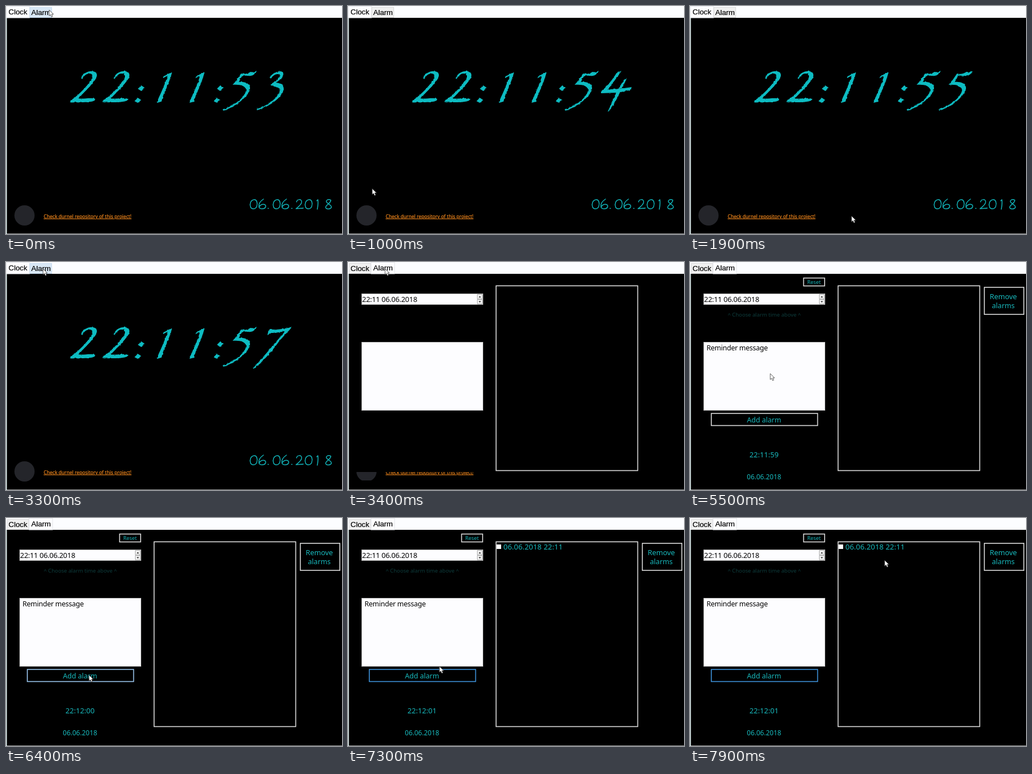
Animation of 599 by 405 pixels, one loop 8 s. Source, as an HTML page:

```html
<!DOCTYPE html>
<html lang="en">
<head>
<meta charset="utf-8">
<title>Desktop clock</title>
<style>
html, body { margin: 0; width: 100%; height: 100%; overflow: hidden; background: #fcfdff; }
svg { display: block; width: 599px; height: 405px; }
text { font-family: "Noto Sans", "Open Sans", sans-serif; white-space: pre; }
.tab { font: 13.4px "Liberation Sans", Arial, sans-serif; stroke: #000; stroke-width: .2; }
.teal { fill: #18b8bc; }
.mid { text-anchor: middle; }
.frame { fill: none; stroke: #dcdcdc; stroke-width: 1.6; }
</style>
</head>
<body>
<svg viewBox="0 0 599 405" xmlns="http://www.w3.org/2000/svg">
  <defs>
    <filter id="rough" x="-5%" y="-10%" width="110%" height="120%">
      <feTurbulence type="fractalNoise" baseFrequency=".22" numOctaves="2" seed="4"/>
      <feDisplacementMap in="SourceGraphic" scale="3" xChannelSelector="R" yChannelSelector="G"/>
    </filter>
    <clipPath id="leftover"><path d="M0 347h250v5H0zM0 373h250v15H0z"/></clipPath>
  </defs>
  <rect width="599" height="405" fill="#fcfdff"/>
  <path d="M0 21H1.5V405H0z" fill="#e6fafa"/>
  <rect x="1.5" y="21" width="597.5" height="383.4"/>
  <rect id="clockTab"/>
  <rect id="alarmTab"/>
  <text id="clockName" class="tab" x="4.5">Clock</text>
  <text id="alarmName" class="tab" x="45">Alarm</text>

  <g id="clockPage">
    <g id="digits" fill="#10bcc2" filter="url(#rough)"></g>
    <g id="bigDate" fill="none" stroke="#12b4ba" stroke-width="1.5" stroke-linecap="round" stroke-linejoin="round"></g>
  </g>
  <g id="footer">
    <circle cx="33" cy="372" r="18" fill="#24252a"/>
    <text x="67.3" y="376.7" font-size="8.58" fill="#e8821c" stroke="#e8821c" stroke-width=".2" text-decoration="underline">Check durnel repository of this project!</text>
  </g>

  <g id="alarmPage">
    <rect x="24.5" y="56.5" width="216" height="19" fill="#fdfdff" stroke="#b4b4b4"/>
    <text x="25" y="71" font-size="13" letter-spacing="-.3">22:11 06.06.2018</text>
    <path d="M230.5 57.5h9v8h-9zM230.5 66.5h9v8h-9z" fill="#f0f0f0" stroke="#b0b0b0"/>
    <path d="M233 63l2-2.5 2 2.5zM233 69.5l2 2.5 2-2.5z" fill="#222"/>
    <rect x="24.5" y="142.5" width="216" height="121" fill="#fdfdff" stroke="#b4b4b4"/>
    <rect class="frame" x="264" y="42.3" width="252.5" height="328.2"/>
    <g id="controls">
      <rect class="frame" x="202.5" y="28.5" width="37.5" height="14"/>
      <text class="teal mid" x="221" y="39" font-size="9.3">Reset</text>
      <text class="mid" x="132.5" y="96.5" font-size="9.6" fill="#0d3c3c">^ Choose alarm time above ^</text>
      <text x="29.5" y="157" font-size="12.5" letter-spacing="-.25">Reminder message</text>
      <rect class="frame" id="addBox" x="38" y="269" width="189.5" height="21.5"/>
      <text class="teal mid" x="132" y="284.5" font-size="12.6">Add alarm</text>
      <text class="teal mid" id="smallTime" x="132" y="346.5" font-size="13.1"></text>
      <text class="teal mid" x="132" y="386" font-size="12">06.06.2018</text>
      <rect class="frame" x="524.7" y="45" width="70.5" height="48"/>
      <text class="teal mid" x="558.5" y="66" font-size="12.9">Remove</text>
      <text class="teal mid" x="558.5" y="82" font-size="12.6">alarms</text>
    </g>
    <g id="item">
      <rect x="265" y="47" width="8" height="8" fill="#fff"/>
      <text class="teal" x="277" y="56" font-size="13.35">06.06.2018 22:11</text>
    </g>
  </g>
  <path id="pointer" d="M0 0V10.5L2.4 8.3L4.2 12.3L6.2 11.4L4.5 7.6H7.7Z" fill="#fff" stroke="#333" stroke-width=".8"/>
</svg>
<script>
const $ = id => document.getElementById(id);
const LOOP = 8000, OPEN = 3400, READY = 3500, ADDED = 7100;

// Brush digits: each outline sits in a cell with its own left edge.
const BRUSH = {
  1: 'M12 126C18 122 23 119 28 118C25 129 19 145 13 157C11 163 10 168 9 170L1 172C3 164 9 154 13 143C16 136 18 130 20 124C17 125 15 127 12 128Z',
  2: 'M21 128C24 120 33 115 42 116C50 117 51 124 46 131C39 141 27 153 16 164C24 166 37 162 46 165L45 168C37 171 27 171 17 171C10 171 4 172 0 171L2 168C17 158 31 143 39 131C43 124 41 120 36 120C29 120 25 126 22 130Z',
  3: 'M28 127C33 119 41 116 49 116C55 118 53 127 44 133L39 136C49 137 54 142 53 149C50 161 32 177 6 185L5 183C25 177 43 163 46 151C45 144 40 142 30 141L30 139C38 134 46 127 46 122C41 119 34 123 30 129Z',
  4: 'M38 117L45 116C38 127 28 139 21 148C33 148 42 147 50 146L64 144L61 149C54 152 48 152 43 153C37 166 31 177 24 186L21 188C26 176 31 165 36 154C26 154 17 155 9 155L11 150C23 140 31 128 38 117ZM50 131L55 129L46 146L40 147Z',
  5: 'M34 120C40 122 46 120 51 117C55 118 59 117 62 115C60 121 54 125 47 124C43 124 39 123 36 124L30 135C41 134 51 138 50 147C47 160 28 177 3 186L1 184C22 177 40 163 43 150C43 142 33 139 19 140C25 134 29 127 34 120Z',
  6: 'M54 115L58 117C45 125 29 140 22 153C31 144 48 139 51 149C53 161 36 173 22 172C7 171 9 157 20 143C30 131 42 120 54 115ZM22 164C30 170 43 159 43 152C40 146 20 156 22 164Z',
  7: 'M26 121C32 118 36 121 41 120C50 119 58 118 68 115C63 122 53 131 44 142C35 155 21 171 7 184L-1 190L0 187C14 172 33 149 47 133C51 129 53 126 55 123C46 125 37 126 31 126L24 130Z',
  ':': 'M12 141L18 145L12 151L6 147ZM6 163L12 167L6 172L0 169Z'
};
const CELLS = [113, 171, 229, 268, 326, 370, 385, 442];

// Pen strokes for the small date.
const PEN = {
  0: 'M7 1C1 2-1 9 1 14C3 19 10 18 12 13C14 7 12 0 7 1Z',
  1: 'M1 3L3 1C4 7 3 12 2 18',
  2: 'M2 5C3 0 11-1 11 5C11 10 5 14 1 17C6 16 10 17 14 16',
  6: 'M9 0C3 4 0 9 1 14C3 19 12 18 13 13C13 8 5 8 2 13',
  8: 'M11 2C6-1 1 3 4 6C8 10 13 11 12 15C9 19 1 18 2 14C3 10 11 7 11 2',
  '.': 'M1 16.5h1'
};
const PEN_X = [435, 450, 466, 476, 491, 508, 516, 533, 553, 568];

// Pointer stops: time, x, y.
const STOPS = [
  [700, 77, 7], [1100, 37, 382], [1300, 160, 375], [1500, 288, 373], [1900, 288, 373],
  [2600, 163, 105], [3100, 66, 12], [3700, 66, 12], [4600, 139, 132],
  [4800, 139, 132], [6300, 148, 279], [7200, 148, 279], [7800, 347, 75]
];

const glyph = (d, x, y = 0) => `<path transform="translate(${x} ${y})" d="${d}"/>`;
const show = (id, on) => $(id).setAttribute('display', on ? 'inline' : 'none');
const set = (id, o) => { for (const k in o) $(id).setAttribute(k, o[k]); };

$('bigDate').innerHTML = [...'06.06.2018'].map((c, i) => glyph(PEN[c], PEN_X[i], 343)).join('');

function pointerAt(t) {
  const i = STOPS.findIndex(s => s[0] > t);
  if (i === 0) return STOPS[0].slice(1);
  if (i < 0) return STOPS[STOPS.length - 1].slice(1);
  const [t0, x0, y0] = STOPS[i - 1], [t1, x1, y1] = STOPS[i];
  const p = (t - t0) / (t1 - t0), e = p * p * (3 - 2 * p);
  return [x0 + (x1 - x0) * e, y0 + (y1 - y0) * e];
}

function timeAt(t) {
  const s = 11 * 60 + 53 + Math.floor((t + 700) / 1000);
  const two = n => String(n).padStart(2, '0');
  return `22:${two(Math.floor(s / 60))}:${two(s % 60)}`;
}

function drawTab(name, x, w, active, hover) {
  set(name + 'Tab', {
    x: active ? x - 1.5 : x, width: active ? w + 3 : w,
    y: active ? 0.5 : 2.5, height: active ? 20.5 : 18,
    fill: active ? '#fdfdff' : hover ? '#d8e7f5' : '#f0f0f0',
    stroke: active ? '#e4e6ea' : hover ? '#c8dcf0' : '#d9d9d9'
  });
  $(name + 'Name').setAttribute('y', active ? 14.8 : 15.6);
}

let shown = '';
function render(t) {
  const alarm = t >= OPEN, time = timeAt(t);
  const [x, y] = pointerAt(t);
  const over = (l, top, r, b) => x >= l && x <= r && y >= top && y <= b;

  drawTab('clock', 2.5, 38, !alarm, false);
  drawTab('alarm', 42.5, 39, alarm, over(42, 2, 82, 21));
  show('clockPage', !alarm);
  show('alarmPage', alarm);
  show('controls', t >= READY);
  show('item', t >= ADDED);
  show('footer', t < READY);
  $('footer').setAttribute('clip-path', alarm ? 'url(#leftover)' : 'none');

  if (time !== shown) {
    shown = time;
    $('smallTime').textContent = time;
    if (!alarm) $('digits').innerHTML = [...time].map((c, i) => glyph(BRUSH[c], CELLS[i])).join('');
  }
  const hot = over(37, 268, 228, 291);
  $('addBox').style.stroke = hot ? '#9cc8f0' : t >= ADDED ? '#3f94dc' : '#dcdcdc';
  $('pointer').setAttribute('transform', `translate(${x} ${y})`);
}

function tick() {
  render(performance.now() % LOOP);
  requestAnimationFrame(tick);
}
render(0);
requestAnimationFrame(tick);
</script>
</body>
</html>
```
